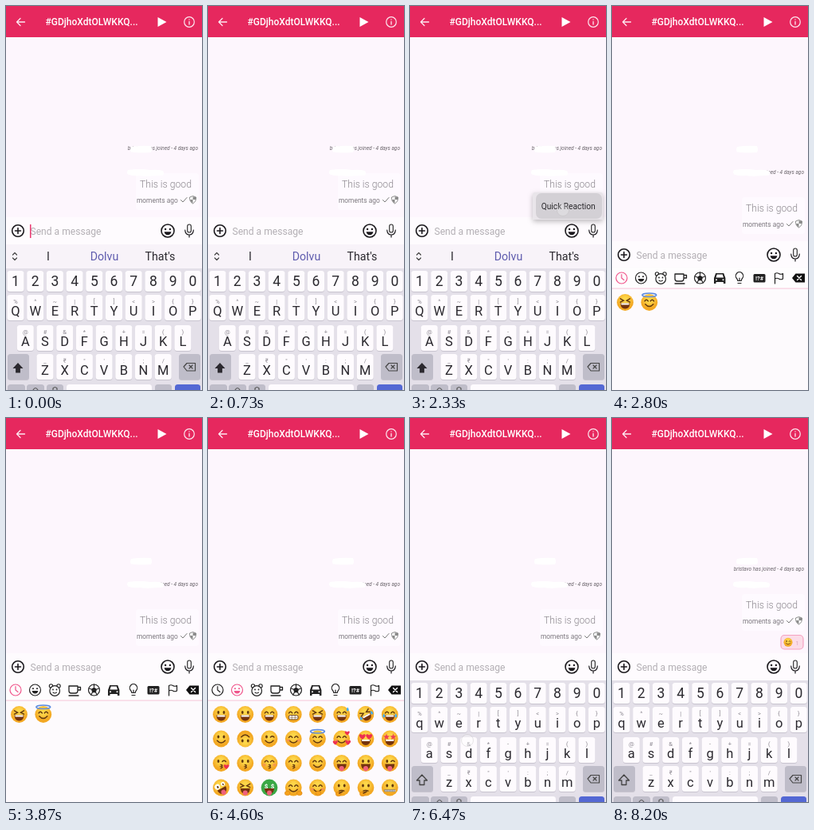
An HTML page for the animation above (8590 ms loop, 246x480 px).

```html
<!DOCTYPE html>
<html lang="en">
<head>
<meta charset="utf-8">
<title>Quick reaction</title>
<style>
html, body { margin: 0; width: 100%; height: 100%; overflow: hidden; background: #fdf6fd; }
svg { display: block; width: 100%; height: 100%; font-family: Roboto, sans-serif; }
.line { fill: none; stroke: currentColor; stroke-linecap: round; stroke-linejoin: round; }
.mid { text-anchor: middle; }
.ink { fill: #2b292f; }

.list, .bar, .cursor, .before, .panel, .keys, .upper, .lower, .popup, .sheet, .popup text, .press,
.recent, .smileys, .tab-recent, .tab-smileys, .chip, .touch, .spot { animation: 8590ms infinite step-end; }

.list { animation-name: list; animation-timing-function: linear; }
.bar { animation-name: bar; }
.cursor { animation-name: cursor; }
.before, .upper { animation-name: before; }
.lower { animation-name: after; }
.keys { animation-name: keys; }
.panel { animation-name: panel; }
.recent { animation-name: recent; }
.smileys { animation-name: smileys; }
.tab-recent { animation-name: tab-recent; }
.tab-smileys { animation-name: tab-smileys; }
.popup { animation-name: popup; animation-timing-function: linear; }
.sheet { animation-name: grow; animation-timing-function: ease-out; }
.popup text { animation-name: settle; animation-timing-function: ease-out; }
.press { animation-name: press; animation-timing-function: linear; }
.chip { animation-name: chip; animation-timing-function: linear; }
.spot { animation-name: spot; }
.touch { animation-name: touch; animation-timing-function: linear; }

@keyframes list {
  0%, 32.59% { transform: translateY(0); }
  32.6%, 86.1% { transform: translateY(30px); }
  88%, 99.99% { transform: translateY(11px); }
  100% { transform: translateY(0); }
}
@keyframes bar { 0% { transform: none; } 32.6%, 100% { transform: translateY(30px); } }
@keyframes cursor { 0% { opacity: 1; } 5.82%, 100% { opacity: 0; } }
@keyframes before { 0% { opacity: 1; } 32.6%, 100% { opacity: 0; } }
@keyframes after { 0% { opacity: 0; } 32.6%, 100% { opacity: 1; } }
@keyframes keys { 0% { opacity: 1; } 32.6% { opacity: 0; } 73.7%, 100% { opacity: 1; } }
@keyframes panel { 0% { opacity: 0; } 32.6% { opacity: 1; } 73.7%, 100% { opacity: 0; } }
@keyframes recent { 0% { opacity: 1; } 50.6%, 100% { opacity: 0; } }
@keyframes smileys { 0% { opacity: 0; } 50.6%, 100% { opacity: 1; } }
@keyframes tab-recent { 0% { color: #f0578c; } 50.6%, 100% { color: #222; } }
@keyframes tab-smileys { 0% { color: #222; } 50.6%, 100% { color: #f0578c; } }
@keyframes popup { 0%, 15.4% { opacity: 0; } 16.1%, 29.1% { opacity: 1; } 30.2%, 100% { opacity: 0; } }
@keyframes grow {
  0%, 16.4% { x: 163px; y: 226px; width: 75px; height: 32px; fill: #f9f4f9; }
  18.2%, 25.3% { x: 154px; y: 233px; width: 88px; height: 34px; fill: #f9f4f9; }
  26.2%, 100% { x: 154px; y: 233px; width: 88px; height: 34px; fill: #e9e5ea; }
}
@keyframes settle { 0%, 16.4% { transform: translate(1px, -9px); } 18.2%, 100% { transform: none; } }
@keyframes press { 0%, 25.3% { opacity: 0; } 26.2%, 100% { opacity: 1; } }
@keyframes chip { 0%, 86.1% { opacity: 0; } 88%, 99.99% { opacity: 1; } 100% { opacity: 0; } }
@keyframes spot {
  0% { transform: translate(199px, 230px); }
  20% { transform: translate(192px, 255px); }
  40% { transform: translate(36px, 340px); }
  60%, 100% { transform: translate(72px, 403px); }
}
@keyframes touch {
  0%, 9.8% { opacity: 0; } 10.4%, 16.8% { opacity: 1; } 17.6%, 25% { opacity: 0; }
  25.6%, 26.8% { opacity: .6; } 28%, 48.6% { opacity: 0; }
  49.2%, 50.4% { opacity: 1; } 51.2%, 71.6% { opacity: 0; }
  72.3%, 74.6% { opacity: 1; } 76.4%, 100% { opacity: 0; }
}
</style>
</head>
<body>
<svg id="stage" viewBox="0 0 246 480" preserveAspectRatio="none"></svg>
<script>
const path = (d, attrs = '') => `<path d="${d}" ${attrs}/>`;
const line = (d, width = 1.4, attrs = '') => path(d, `class="line" stroke-width="${width}" ${attrs}`);
const rect = (x, y, w, h, fill, r = 0, attrs = '') =>
  `<rect x="${x}" y="${y}" width="${w}" height="${h}" rx="${r}" fill="${fill}" ${attrs}/>`;
const disc = (x, y, r, attrs = '') => `<circle cx="${x}" cy="${y}" r="${r}" ${attrs}/>`;
const ring = (x, y, r, width = 1.4) => disc(x, y, r, `class="line" stroke-width="${width}"`);
const oval = (x, y, rx, ry, attrs = '') => `<ellipse cx="${x}" cy="${y}" rx="${rx}" ry="${ry}" ${attrs}/>`;
const text = (x, y, size, str, attrs = '') => `<text x="${x}" y="${y}" font-size="${size}" ${attrs}>${str}</text>`;
const group = (cls, ...parts) => `<g class="${cls}">${parts.join('')}</g>`;
const at = (x, y, body, more = '') => `<g transform="translate(${x} ${y}) ${more}">${body}</g>`;
const esc = c => ({ '<': '&lt;', '>': '&gt;', '&': '&amp;' })[c] || c;

// Emoji: first letter picks the eyes, second the mouth, the rest are extras
const brown = '#63390f';
const stroke = (d, w = 1.5) => path(d, `fill="none" stroke="${brown}" stroke-width="${w}" stroke-linecap="round"`);
const heart = (x, y, s) => at(x, y, path('M0 3C-7-2-2.5-5 0-2C2.5-5 7-2 0 3', 'fill="#ee2f4f"'), `scale(${s})`);
const star = (x, y) => at(x, y, path('M0-4L1-1.2 4-1 1.7.8 2.5 3.6 0 2-2.5 3.6-1.7.8-4-1-1-1.2z', 'fill="#ee3f55"'));
const dot = (x, r = 1.4) => oval(x, -2.5, r, r * 1.4, `fill="${brown}"`);
const dollar = x => text(x, 1, 8, '$', 'class="mid" fill="#fff" font-weight="700"');
const drop = (x, y) => path(`M${x} ${y}q-3 4 0 5q3-1 0-5`, 'fill="#45adf0"');
const blush = x => oval(x, 2, 2.2, 1.5, 'fill="#f58a5a" opacity=".7"');
const hand = (x, y) => oval(x, y, 3.4, 2.7, 'fill="#f6a21c" stroke="#d98212" stroke-width=".6"');
const grin = path('M-6 1h12q-.5 7-6 7t-6-7z', 'fill="#74330f"');

const eyes = {
  o: dot(-3.5) + dot(3.5),
  '^': stroke('M-5.7-1.6q2.1-3.4 4.2 0M1.5-1.6q2.1-3.4 4.2 0'),
  x: stroke('M-6-4.6l4 2.2-4 2M6-4.6l-4 2.2 4 2'),
  w: dot(-3.5) + stroke('M1.5-2q2.1-2.4 4.4 0'),
  h: heart(-4.2, -2.5, 1.05) + heart(4.2, -2.5, 1.05),
  s: star(-4.2, -2.6) + star(4.2, -2.6),
  d: dollar(-4) + dollar(4),
  Z: disc(-3.8, -3, 3.4, 'fill="#fff"') + disc(4, -3, 2.5, 'fill="#fff"') + dot(-3.4, 1.1) + dot(4, .9)
};
const mouths = {
  G: grin + rect(-5, 1, 10, 2, '#fff', .6),
  S: stroke('M-5 2.2q5 5.6 10 0'),
  T: rect(-6, 1, 12, 5.4, '#fff', 2.4, `stroke="${brown}" stroke-width=".9"`) + stroke('M-5.5 3.7h11M-2 1v5M2 1v5', .5),
  k: stroke('M-.5 1.8q4 .6 .3 2.3q4 .6-.3 2.4', 1.3),
  p: grin + oval(0, 6.6, 3, 3.2, 'fill="#f0607c"'),
  f: stroke('M-3 4.2q3-1.6 6 0'),
  z: path('M-7 3.8h14', 'stroke="#777" stroke-width="2.8"') + path('M-6 3.8h13', 'stroke="#eee" stroke-width="1.8" stroke-dasharray="1 1"')
};
const extras = {
  '~': drop(7.5, -9),
  t: drop(-7.5, -1) + drop(7.5, -1),
  '@': oval(0, -9.2, 9, 2.2, 'fill="none" stroke="#5b8be0" stroke-width="1.5"'),
  b: blush(-6.5) + blush(6.5),
  '*': heart(-8, 5, .8) + heart(8, 5, .9) + heart(7, -7, .8),
  3: heart(6.6, 4.6, .9),
  H: hand(-7.5, 7) + hand(7.5, 7),
  c: hand(1, 7),
  q: hand(-4, 8) + stroke('M-3 7l4-2')
};
function face(x, y, code, scale = 1) {
  const [eye, mouth, ...more] = code;
  const skin = more.includes('g') ? '#3aa845' : 'url(#skin)';
  const pose = more.includes('u') ? ' rotate(180)' : more.includes('r') ? ' rotate(-28)' : '';
  const body = disc(0, 0, 10.4, `fill="${skin}"`) + eyes[eye] + mouths[mouth] + more.map(m => extras[m] || '').join('');
  return at(x, y, body, `scale(${scale})${pose}`);
}
const faces = ('oG oG ^G ^T xG ^G~ xGtr ^Gt oS oSu wS ^Sb ^S@ ^Sb* hG sG ' +
  'wk3 ok ^kb ^k ^S ^p op wp Zpr xp dpg ^SH ^Sbc ofq ofq oz').split(' ');

// Keyboard
const rows = [
  { chars: 'qwertyuiop', hints: '%^~|[]<>{}', x: 12, y: 361 },
  { chars: 'asdfghjkl', hints: '@#&*-+=()', x: 24.3, y: 399 },
  { chars: 'zxcvbnm', hints: '_₹"\':;/', x: 49, y: 435 }
];
const digits = { chars: '1234567890', x: 12, y: 331 };
const pitch = 24.7;
const dim = '#bfbdc9';
const key = (x, y, w, h, fill = '#fefbfe') => rect(x, y + 1, w, h, '#c8c4cf', 3.5) + rect(x, y, w, h, fill, 3.5);
const each = (row, draw) => [...row.chars].map((c, i) => draw(c, row.x + i * pitch, row.y, i)).join('');
const letters = fit => rows.map(row => each(row, (c, x, y) => text(x, y + 26.3, 16.5, fit(c), 'class="mid ink"'))).join('');
const arrow = 'M15 446l6.5 7h-3.6v5.5h-5.8V453H8.5z';

const keyboard = group('keys',
  rect(0, 328, 246, 152, '#e4e0e9'),
  each(digits, (c, x, y) => key(x - 10.5, y, 21, 26) + text(x, y + 19.4, 17.5, c, 'class="mid ink"')),
  ...rows.map(row => each(row, (c, x, y, i) => key(x - 10.5, y, 21, 32) +
    text(x, y + 10.5, 7.5, esc(row.hints[i]), 'class="mid" fill="#8b8790"'))),
  key(2, 435, 27, 32, dim), key(217, 435, 27, 32, dim),
  group('upper', letters(c => c.toUpperCase()), path(arrow, 'class="ink"')),
  group('lower', letters(c => c), line(arrow, 1.3, 'color="#444"')),
  line('M223 451l4-4.5h10.5v9.5h-10.5zM230 449l4 4m0-4l-4 4', 1.2, 'color="#444"'),
  key(2, 473, 22, 20, dim), key(26, 473, 22, 20, dim), key(51, 473, 21, 20, dim),
  key(76, 473, 107, 20), key(187, 473, 21, 20, dim), key(212, 473, 32, 20, '#5468d4'),
  line('M34 480q3-5 6 0M59 480v-2q2.5-3 5 0v2', 1.2, 'color="#555"'));

const suggestions = group('before',
  rect(0, 298, 246, 30, '#f8f3f9'),
  line('M8.5 311l2.5-2.5 2.5 2.5M8.5 315l2.5 2.5 2.5-2.5', 1.2, 'color="#444"'),
  text(53, 318, 14.2, 'I', 'class="mid ink"'),
  text(123.5, 318, 14.2, 'Dolvu', 'class="mid" fill="#5f5cae"'),
  text(193.5, 318, 14.2, "That's", 'class="mid ink"'));

// Emoji panel
const pupil = (x, y, r) => disc(x, y, r, 'fill="currentColor"');
const smile = (x, y, r, w) => ring(x, y, r, w) + pupil(x - r * .36, y - r * .25, r * .15) + pupil(x + r * .36, y - r * .25, r * .15) +
  path(`M${x - r * .55} ${y + r * .15}h${r * 1.1}q${-r * .1} ${r * .5} ${-r * .55} ${r * .5}t${-r * .55} ${-r * .5}`, 'fill="currentColor"');
const tabs = [
  group('tab-recent', ring(12, 340, 7, 1.2), line('M12 335.5v4.5l3 2.5', 1.2)),
  group('tab-smileys', smile(36.5, 340, 7, 1.2)),
  ring(56.5, 335, 2.2, 1.1), ring(66, 335, 2.2, 1.1), disc(61.2, 341, 6.3, 'fill="#fff" stroke="#222" stroke-width="1.2"'),
  pupil(59, 339.5, .9), pupil(63.5, 339.5, .9), line('M59 343q2.2 2 4.5 0', 1.1),
  line('M79 335h11v6q0 3-3 3h-5q-3 0-3-3zM90 336.5h3.5v3.5h-3.5M79 347h12', 1.3),
  ring(110.5, 340, 7, 1.2), path('M110.5 336.5l3.6 2.6-1.4 4.2h-4.4l-1.4-4.2z', 'fill="currentColor"'),
  line('M110.5 333v3M104 338l3 1M117 338l-3 1M106.5 346l2-3M114.5 346l-2-3', 1.3),
  path('M128 347v-7l2.2-6h10l2.2 6v7h-2.5v-2h-9.4v2zM130.5 339.5h9.5l-1.3-4h-7z', 'fill="currentColor" fill-rule="evenodd"'),
  disc(131, 342.3, 1, 'fill="#fff"'), disc(139.5, 342.3, 1, 'fill="#fff"'),
  line('M157.8 343.5q0-1.5-1.3-3a4.7 4.7 0 1 1 7 0q-1.3 1.5-1.3 3zM158 346.5h4M160 343v-3', 1.2),
  rect(177.5, 335, 15, 10.5, '#222', 1.5), text(185, 343, 7.5, '!?#', 'class="mid" fill="#fff" font-weight="700"'),
  line('M204.5 347v-12.5q2.5-1.5 5 0t5 0v6.5q-2.5 1.5-5 0t-5 0', 1.2),
  path('M226 340l4.5-5.5h11.5v11h-11.5z', 'fill="#111"'), line('M232.5 337.5l5 5m0-5l-5 5', 1.4, 'color="#fff"')
].join('');

const panel = group('panel',
  rect(0, 326, 246, 154, '#fdfafd'), rect(0, 327, 246, 26, '#fefdfe'),
  `<g color="#222">${tabs}</g>`, rect(0, 352.5, 246, 1.2, '#f8cfdf'),
  group('recent', face(16.5, 370.5, 'xG'), face(46.8, 370.5, '^S@')),
  group('smileys', ...faces.map((code, i) => face(16.5 + i % 8 * 30.25, 370.5 + (i >> 3) * 30.5, code))));

// Conversation
const shield = path('M234.5 237.5l4 1.5q.3 5.5-4 8q-4.3-2.5-4-8z', 'fill="#fff" stroke="#8c8c8c" stroke-width="1"') +
  path('M234.5 238v4h3.6q.4-1.5.2-2.7zM234.5 242v4.6q-3-1.8-3.6-4.6z', 'fill="#8c8c8c"');
const list = group('list',
  rect(163, 209, 79, 46, '#fefaff', 4),
  text(241, 180.3, 6.5, 'bristavo has joined - 4 days ago', 'text-anchor="end" font-style="italic" fill="#6a656b"'),
  text(168, 226.5, 12.2, 'This is good', 'fill="#8a868c" font-weight="300"'),
  text(164, 245.5, 8.4, 'moments ago', 'fill="#7d797f"'),
  line('M219.5 242.5l2.5 2.5 5-5.5', 1, 'color="#777"'), shield,
  group('chip', rect(212, 260.5, 28, 17.5, '#fbdce8', 4.5, 'stroke="#f5a3c2" stroke-width="1.2"'),
    face(221, 269.3, 'wS', .53), text(232.5, 272.5, 8, '1', 'class="mid" fill="#d9a9bd"')));
const blots = path('M157 176q12-2 25-1q2 4 0 8q-13 1-25-.5q-2-3 0-6.5M153 205q16-2 28 0q9-1 16 1q2 3 0 5.5q-20 2-29 .5q-9 1-15-1.5q-2-2 0-5.5', 'fill="#fff"');

const bar = group('bar',
  rect(0, 264, 246, 34, '#fefbfe'),
  `<g color="#1c1a1e">${ring(15, 281, 7.3, 1.6)}${line('M11.5 281h7M15 277.5v7', 1.6)}${smile(203, 281, 8, 1.6)}
  ${rect(227.7, 273, 4.6, 10, 'none', 2.3, 'stroke="#333" stroke-width="1.2"')}${line('M224.7 280q.3 6 5.3 6t5.3-6M230 286v3', 1.2)}</g>`,
  text(30.5, 285.5, 12.1, 'Send a message', 'fill="#b3afb4"'),
  rect(30, 273, 1.5, 17, '#ea3a70', 0, 'class="cursor"'));

const header = rect(0, 0, 246, 39, '#e6285e') +
  `<g color="#fde8f0">${line('M23.5 20H13.5M18 15.5L13.5 20l4.5 4.5', 1.3)}${ring(230, 20, 6.3, 1.2)}${line('M230 19.5v3.5M230 17v.01', 1.3)}</g>` +
  path('M190.5 14l11 6-11 6z', 'fill="#fff"') +
  text(49.5, 24.2, 12, '#GDjhoXdtOLWKKQ...', 'fill="#fff" font-weight="500"');

const popup = group('popup',
  rect(154, 233, 88, 34, '#f9f4f9', 2, 'class="sheet" filter="url(#shadow)"'),
  rect(158, 234, 83, 32, '#d3d0d5', 7, 'class="press"'),
  text(198.7, 254.3, 10.2, 'Quick Reaction', 'class="mid" fill="#2a282c"'));

const touch = group('spot', disc(0, 0, 7.5, 'class="touch" fill="#fff" fill-opacity=".55" stroke="#aaa" stroke-opacity=".6" stroke-width=".8"'));

document.getElementById('stage').innerHTML = `<defs>
  <radialGradient id="skin" cy=".35"><stop offset=".3" stop-color="#fdd649"/><stop offset="1" stop-color="#f3a823"/></radialGradient>
  <filter id="shadow" x="-20%" y="-30%" width="140%" height="180%"><feDropShadow dx="0" dy="2.5" stdDeviation="3.2" flood-opacity=".26"/></filter>
  </defs>` + rect(0, 0, 246, 480, '#fdf6fd') + list + blots + bar + suggestions + keyboard + panel + popup + header + touch;
</script>
</body>
</html>
```
